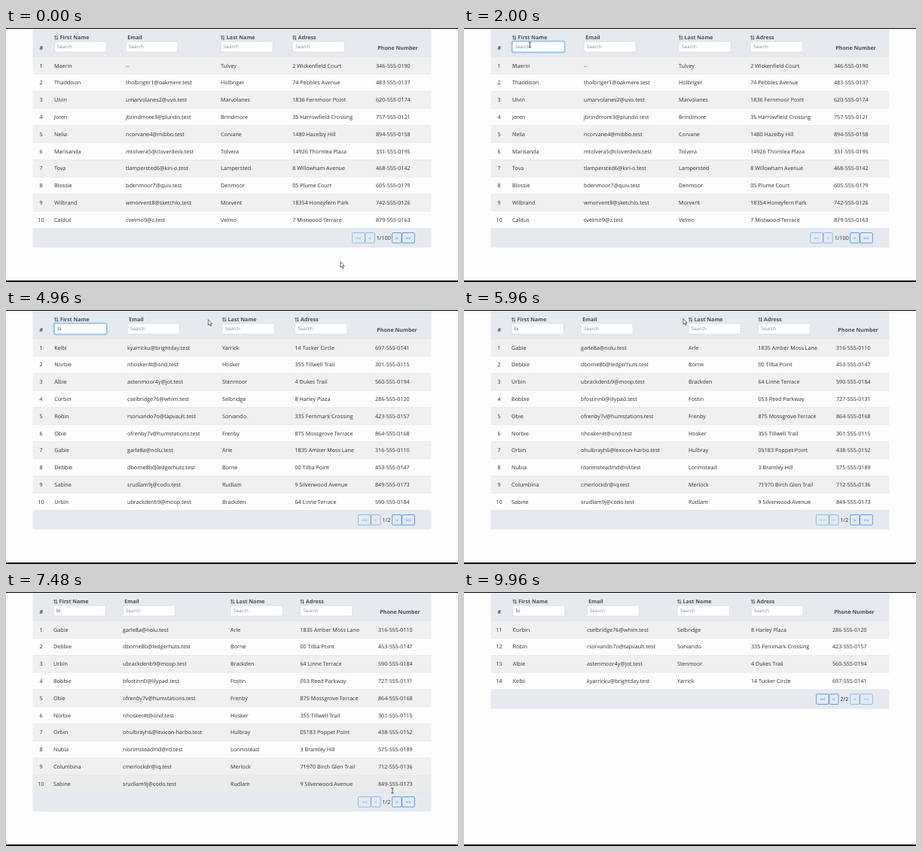
An HTML page that plays this animation: 600x338 px, repeating every 10 s.

```html
<!DOCTYPE html>
<html lang="en">
<head>
<meta charset="utf-8">
<title>Searchable table</title>
<style>
  html, body { margin: 0; width: 100%; height: 100%; overflow: hidden; background: #fdfdfe; }
  svg { display: block; width: 600px; height: 338px; }
  text { font: 7.2px "Open Sans", "Noto Sans", sans-serif; fill: #2b2f33; text-rendering: geometricPrecision; white-space: pre; }
  .head { font-weight: 700; font-size: 7.1px; fill: #495057; }
  .input { font-size: 6.3px; fill: #495057; }
  .hint { font-size: 6.3px; fill: #858c94; }
  .btn { font-size: 6.4px; text-anchor: middle; }
  .mid { text-anchor: middle; }
</style>
</head>
<body>
<svg id="stage" viewBox="0 0 600 338"></svg>
<script>
const LOOP = 10000;
const LEFT = 35.5, WIDTH = 529, TOP = 38.7, PITCH = 22.78;
const BLUE = '#007bff';

// first name | email suffix | last name | address
const allPeople = parse(`Maerin||Tulvey|2 Wickenfield Court
Thaddison|1@oakmere.test|Holbriger|74 Pebbles Avenue
Ulvin|2@uvo.test|Marvolanes|1836 Fernmoor Point
Joren|3@plundo.test|Brindmore|35 Harrowfield Crossing
Nelia|4@mibbo.test|Corvane|1480 Hazelby Hill
Marisanda|5@cloverdeck.test|Tolvera|14926 Thornlea Plaza
Tova|6@kiri-o.test|Lampersted|8 Willowham Avenue
Blossie|7@quiv.test|Denmoor|05 Plume Court
Wilbrand|8@sketchlo.test|Morvent|18354 Honeyfern Park
Caldus|9@z.test|Velmo|7 Mistwood Terrace`, 0);

const matches = parse(`Gabie|8a@nolu.test|Arle|1835 Amber Moss Lane
Debbie|8b@ledgerhuts.test|Borne|00 Tilba Point
Urbin|b9@moop.test|Brackden|64 Linne Terrace
Bobbie|n0@lilypad.test|Fostin|053 Reed Parkway
Obie|7v@humstations.test|Frenby|875 Mossgrove Terrace
Norbie|4t@ond.test|Hosker|355 Tillwell Trail
Orbin|h6@lexicon-harbo.test|Hulbray|05183 Poppet Point
Nubia|md@rd.test|Lorimstead|3 Bramley Hill
Columbina|dr@iq.test|Merlock|71970 Birch Glen Trail
Sabine|9j@codo.test|Rudlam|9 Silverwood Avenue
Corbin|76@whim.test|Selbridge|8 Harley Plaza
Robin|7o@tapvault.test|Sorvando|335 Fernmark Crossing
Albie|4y@jot.test|Stenmoor|4 Dukes Trail
Kelbi|u@brightday.test|Yarrick|14 Tucker Circle`, 10);

function parse(lines, offset) {
  return lines.split('\n').map((line, i) => {
    const [first, suffix, last, address] = line.split('|');
    const n = i + offset;
    const email = suffix ? (first[0] + last).toLowerCase() + suffix : '--';
    const phone = `${200 + (n * 137 + 146) % 700}-555-01${10 + (n * 37 + 80) % 90}`;
    return [first, email, last, address, phone];
  });
}

const views = [
  { from: 0, cols: [64, 159, 285, 380.2, 491], rows: allPeople, page: '1/100', prevX: 459.7 },
  { from: 3040, cols: [64.2, 161, 287, 383.5, 490], page: '1/2', prevX: 467.5,
    rows: [13, 5, 12, 10, 11, 4, 0, 1, 9, 2].map(i => matches[i]) },
  { from: 5400, cols: [63, 155, 298, 390.5, 494], rows: matches.slice(0, 10), page: '1/2', prevX: 467.5 },
  { from: 8160, cols: [64.7, 163, 283, 381, 489], rows: matches.slice(10), page: '2/2', prevX: 467.5, last: true }
];

// time, x, y of the pointer's hot spot
const path = [
  [40, 444, 311], [1040, 87.5, 22.5], [4200, 87.5, 22.5], [5160, 291, 11.5],
  [6400, 291, 11.5], [7360, 513, 264.3], [7480, 513, 264.3], [7720, 519.5, 280.3],
  [8480, 519.5, 280.3], [9360, 603, 284]
];

const ramp = (t, a, b) => Math.min(1, Math.max(0, (t - a) / (b - a)));
const ease = u => u * u * (3 - 2 * u);

function pointerAt(t) {
  let [, x, y] = path[0];
  for (let i = 1; i < path.length; i++) {
    const [t0, x0, y0] = path[i - 1], [t1, x1, y1] = path[i];
    if (t < t0) break;
    const u = ease(ramp(t, t0, t1));
    x = x0 + (x1 - x0) * u;
    y = y0 + (y1 - y0) * u;
  }
  return { x, y };
}

const rect = (x, y, w, h, attrs) => `<rect x="${x}" y="${y}" width="${w}" height="${h}" ${attrs}/>`;
const text = (x, y, s, cls = '', attrs = '') =>
  `<text x="${x}" y="${y}" class="${cls}" ${attrs}>${s.replace(/</g, '&lt;')}</text>`;

const sortIcon = x => `<path transform="translate(${x} 9.6)" fill="none" stroke="#495057" stroke-width=".85"
  d="M1.4 6V.6M.1 2 1.4.5 2.6 2M4 .2V5.6M2.8 4.2 4 5.7 5.2 4.2"/>`;

function searchBox(x, value, focus, caret) {
  let s = '';
  if (focus) s += rect(x - .8, 17.2, 70.6, 15.6, `rx="2.6" fill="none" stroke="${BLUE}" stroke-opacity="${.3 * focus}" stroke-width="1.6"`);
  s += rect(x + .2, 18, 69, 14, 'rx="1.8" fill="#fff" stroke="#ced4da" stroke-width=".6"');
  if (focus) s += rect(x + .2, 18, 69, 14, `rx="1.8" fill="none" stroke="#80bdff" stroke-opacity="${focus}" stroke-width=".8"`);
  s += text(x + 4, 27.3, value || 'Search', value ? 'input' : 'hint');
  if (caret) s += rect(x + 4.2 + value.length * 2.8, 21.8, .6, 6.8, 'fill="#333"');
  return s;
}

function header(view, t) {
  const labels = ['First Name', 'Email', 'Last Name', 'Adress'];
  const typed = t < 2840 ? '' : t < 3040 ? 'b' : 'bi';
  const focus = ramp(t, 1120, 1270) - ramp(t, 5120, 5270);
  const caretOn = [[1160, 1440], [2100, 2440], [2840, 3520], [4020, 4520]].some(([a, b]) => t >= a && t < b);
  let s = rect(LEFT, 1, WIDTH, TOP - 1, 'fill="#e6eaee"') + text(46.8, 29.4, '#', 'head mid');
  labels.forEach((label, i) => {
    const x = view.cols[i], sortable = i !== 1;
    if (sortable) s += sortIcon(x);
    s += text(x + (sortable ? 7.6 : 2.2), 15.2, label, 'head');
    s += i ? searchBox(x, '', 0, false) : searchBox(x, typed, focus, caretOn);
  });
  return s + text(view.cols[4] + 2.3, 29.4, 'Phone Number', 'head');
}

function body(view, hovered) {
  return view.rows.map((cells, i) => {
    const y = TOP + i * PITCH, base = y + 14;
    const fill = i === hovered ? '#ecebec' : i % 2 ? '#fdfdfe' : '#f1f0f1';
    const number = String(i + (view.last ? 11 : 1));
    return rect(LEFT, y, WIDTH, PITCH, `fill="${fill}"`) +
      rect(LEFT, y - .25, WIDTH, .5, 'fill="#d9dde1"') +
      text(46.5, base, number, 'mid') +
      cells.map((cell, c) => text(view.cols[c], base, cell)).join('');
  }).join('');
}

function button(x, y, w, label, disabled, filled = 0) {
  const shape = `rx="1.6" fill="${BLUE}" fill-opacity="${filled}" stroke="${BLUE}" stroke-width=".65"`;
  const glow = filled ? rect(x - .7, y - .7, w + 1.4, 15, `rx="2.2" fill="none" stroke="${BLUE}" stroke-opacity="${.4 * filled}" stroke-width="1.4"`) : '';
  return `<g opacity="${disabled ? .65 : 1}">${glow}${rect(x, y, w, 13.6, shape)}` +
    text(x + w / 2, y + 9.1, label, 'btn', `style="fill:${filled > .5 ? '#fff' : BLUE}"`) + '</g>';
}

function footer(view, t) {
  const y = TOP + view.rows.length * PITCH, by = y + 6;
  const filled = ramp(t, 7640, 7760) - ramp(t, 8400, 8550);
  const first = !view.last;
  return rect(LEFT, y, WIDTH, 25.7, 'fill="#e6eaee"') +
    rect(LEFT, y - .25, WIDTH, .5, 'fill="#d9dde1"') +
    button(view.prevX, by, 16.8, '<<', first) +
    button(view.prevX + 17.2, by, 12.4, '<', first) +
    text(view.prevX + 32, y + 15.2, view.page) +
    button(525.6, by, 16.8, '>>', view.last) +
    button(512.6, by, 12.6, '>', view.last, filled);
}

function pointer({ x, y }, beam) {
  const shape = beam
    ? '<path d="M-1.7-3.5Q0-3.5 0-2.7Q0-3.5 1.7-3.5M0-2.7V2.7M-1.7 3.5Q0 3.5 0 2.7Q0 3.5 1.7 3.5" fill="none" stroke="#222" stroke-width=".75"/>'
    : '<path d="M0 0V7.6L1.8 6 3 8.7 4.2 8.2 3 5.6H5.2Z" fill="#fff" stroke="#222" stroke-width=".65" stroke-linejoin="round"/>';
  return `<g transform="translate(${x.toFixed(2)} ${y.toFixed(2)})">${shape}</g>`;
}

function overText(view, p, row) {
  if (view.cols.some(x => x !== view.cols[4] && p.x > x && p.x < x + 69 && p.y > 18 && p.y < 32)) return true;
  const cells = view.rows[row];
  return !!cells && cells.some((cell, c) => p.x > view.cols[c] && p.x < view.cols[c] + cell.length * 4);
}

function render(t) {
  const view = views.filter(v => v.from <= t).pop();
  const p = pointerAt(t);
  const inside = p.x > LEFT && p.x < LEFT + WIDTH;
  const row = inside ? Math.floor((p.y - TOP) / PITCH) : -1;
  return rect(0, 0, 600, 338, 'fill="#fdfdfe"') +
    header(view, t) + body(view, row) + footer(view, t) +
    rect(0, 0, 600, 1, 'fill="#000"') + rect(0, 336, 600, 2, 'fill="#000"') +
    pointer(p, overText(view, p, row));
}

const stage = document.getElementById('stage');
const start = performance.now();
let shown = '';
function tick() {
  const picture = render((performance.now() - start) % LOOP);
  if (picture !== shown) stage.innerHTML = shown = picture;
  requestAnimationFrame(tick);
}
tick();
</script>
</body>
</html>
```
